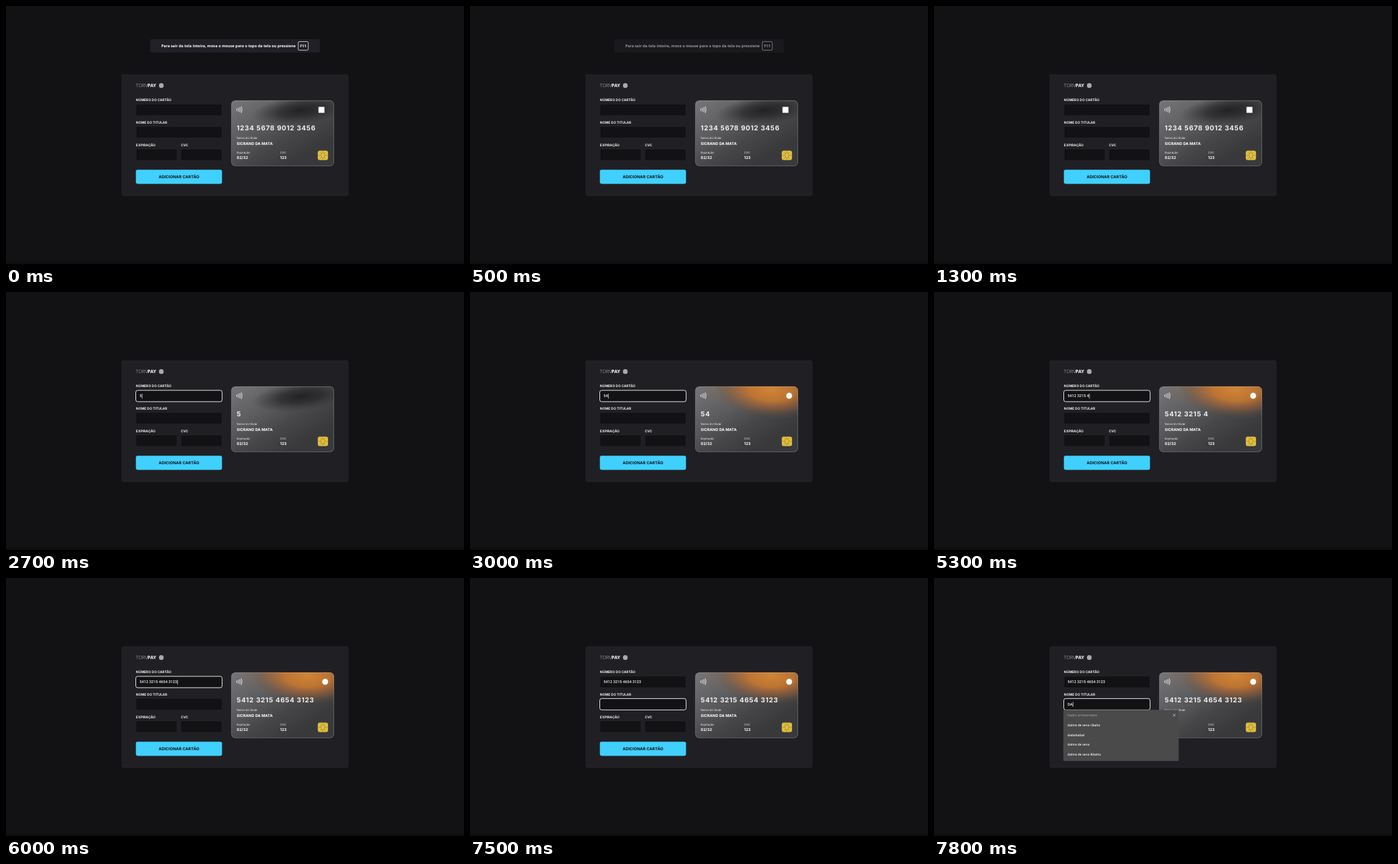
These frames come from a looping animation (690x388 px, 8000 ms). An HTML page with a canvas:

```html
<!DOCTYPE html>
<html lang="pt-BR">
<head>
<meta charset="utf-8">
<title>Cartão</title>
<style>
html, body { margin: 0; width: 100%; height: 100%; overflow: hidden; background: #121214; }
canvas { display: block; width: 690px; height: 388px; }
</style>
</head>
<body>
<canvas id="stage"></canvas>
<script>
const LOOP = 8000, W = 690, H = 388, SCALE = W / 1920;
const canvas = document.getElementById('stage');
const dpr = window.devicePixelRatio || 1;
canvas.width = W * dpr;
canvas.height = H * dpr;
const ctx = canvas.getContext('2d', { alpha: false });

const INTER = 'Inter, sans-serif', ROBOTO = 'Roboto, sans-serif', OPEN = '"Open Sans", sans-serif';
const LIGHT = '#f0f0f3', DARK = '#121214';
const FIELDS = [[545, 411, 360], [545, 504, 360], [545, 598, 172], [733, 598, 172]];
const LABELS = ['NÚMERO DO CARTÃO', 'NOME DO TITULAR', 'EXPIRAÇÃO', 'CVC'];
const NUMBER = '5412 3215 4654 3123';
const SUGGESTIONS = ['dalmo de sena ribalta', 'dadadadad', 'dalmo de sena', 'dalmo de sena Ribalta'];

// [time, characters typed]
const TYPING = [[2700, 1], [2900, 2], [4200, 3], [4600, 4], [4800, 6], [4900, 7], [5000, 8],
  [5200, 9], [5300, 11], [5400, 13], [5500, 14], [5700, 16], [5800, 17], [6000, 19]];
// spans in which the caret is hidden
const CARET_OFF = [[2200, 2700], [3500, 4000], [7500, 7800]];

function text(str, x, y, size, weight, color, family = INTER, align = 'left', spacing = 0) {
  ctx.font = `${weight} ${size}px ${family}`;
  ctx.letterSpacing = spacing + 'px';
  ctx.textAlign = align;
  ctx.fillStyle = color;
  ctx.fillText(str, x, y);
}

function box(x, y, w, h, r, fill, stroke, lineWidth = 1) {
  ctx.beginPath();
  ctx.roundRect(x, y, w, h, r);
  if (fill) { ctx.fillStyle = fill; ctx.fill(); }
  if (stroke) { ctx.strokeStyle = stroke; ctx.lineWidth = lineWidth; ctx.stroke(); }
}

function disc(x, y, r, color) {
  ctx.beginPath();
  ctx.arc(x, y, r, 0, Math.PI * 2);
  ctx.fillStyle = color;
  ctx.fill();
}

function glow(x, y, rx, ry, angle, stops) {
  ctx.save();
  ctx.translate(x, y);
  ctx.rotate(angle);
  ctx.scale(rx, ry);
  const g = ctx.createRadialGradient(0, 0, 0, 0, 0, 1);
  stops.forEach(([at, color]) => g.addColorStop(at, color));
  ctx.fillStyle = g;
  ctx.fillRect(-1, -1, 2, 2);
  ctx.restore();
}

// two-step change starting at a given time
const fade = (t, start) => t < start ? 0 : t < start + 100 ? 0.5 : 1;

function drawNotice(t) {
  const p = Math.max(0, Math.floor(t / 100) - 1) / 9;
  if (p >= 1) return;
  ctx.globalAlpha = 1 - p;
  box(604, 139, 712, 56, 6, '#202026');
  text('Para sair da tela inteira, mova o mouse para o topo da tela ou pressione',
    651, 172.5, 15.75, 700, '#fff', OPEN);
  box(1225, 149, 42, 36, 5, null, '#fff', 2);
  text('F11', 1246, 172.5, 15.75, 700, '#fff', OPEN, 'center');
  ctx.globalAlpha = 1;
}

function drawForm(t, number, name) {
  box(486, 287, 948, 506, 6, '#202024', '#29292e', 2);
  text('TORV', 545, 340, 20, 300, '#d0d0d6', OPEN);
  text('PAY', 593, 340, 20, 700, '#fff', OPEN);
  disc(651, 333, 10, '#a8a8b0');

  const second = fade(t, 7000);
  const focus = [fade(t, 1700) * (1 - second), second, 0, 0];
  FIELDS.forEach(([x, y, w], i) => {
    text(LABELS[i], x, y - 12, 14, 700, LIGHT);
    box(x, y, w, 48, 5, DARK, '#29292e', 1.5);
    if (focus[i]) {
      ctx.globalAlpha = focus[i];
      box(x - 1, y + 0.5, w + 2, 47.5, 8, null, LIGHT, 2.6);
      ctx.globalAlpha = 1;
    }
  });
  text(number, 560, 441, 16, 500, LIGHT, ROBOTO);
  text(name, 560, 534, 16, 500, LIGHT, ROBOTO);

  if (t >= 1700 && !CARET_OFF.some(([a, b]) => t >= a && t < b)) {
    const onName = t >= 7000;
    ctx.font = `500 16px ${ROBOTO}`;
    const x = 560.5 + ctx.measureText(onName ? name : number).width;
    ctx.fillStyle = LIGHT;
    ctx.fillRect(x, onName ? 519 : 426, 2, 20);
  }

  box(544.5, 685, 361, 59, 7, '#40d0ff');
  text('ADICIONAR CARTÃO', 725, 720, 16.8, 700, DARK, INTER, 'center');
}

function drawChip() {
  box(1307, 605, 43, 40, 9, '#e0bf40');
  ctx.strokeStyle = '#94782a';
  ctx.lineWidth = 1.6;
  ctx.beginPath();
  ctx.ellipse(1328.5, 625, 8, 11, 0, 0, Math.PI * 2);
  for (const s of [-1, 1]) {
    ctx.moveTo(1328.5 + s * 8, 625);
    ctx.lineTo(1328.5 + s * 20, 625);
    for (const v of [-1, 1]) {
      ctx.moveTo(1328.5 + s * 6, 625 + v * 8);
      ctx.lineTo(1328.5 + s * 12, 625 + v * 14);
    }
    ctx.moveTo(1328.5, 625 + s * 11);
    ctx.lineTo(1328.5, 625 + s * 18);
  }
  ctx.stroke();
}

function drawCard(t, number, name) {
  const orange = fade(t, 2900);
  ctx.save();
  ctx.beginPath();
  ctx.roundRect(944, 395, 431, 275, 18);
  ctx.clip();
  const base = ctx.createLinearGradient(970, 395, 1150, 690);
  base.addColorStop(0, '#747476');
  base.addColorStop(0.4, '#5c5c5f');
  base.addColorStop(0.7, '#464649');
  base.addColorStop(1, '#39393c');
  ctx.fillStyle = base;
  ctx.fillRect(944, 395, 431, 275);
  ctx.globalAlpha = 1 - orange;
  glow(1235, 436, 205, 62, -0.12, [[0, 'rgba(28,28,31,.9)'], [0.45, 'rgba(32,32,35,.65)'], [1, 'rgba(45,45,48,0)']]);
  ctx.globalAlpha = orange;
  glow(1120, 405, 170, 100, 0.25, [[0, 'rgba(160,112,66,.5)'], [1, 'rgba(130,100,75,0)']]);
  glow(1262, 408, 240, 122, 0.08, [[0, 'rgba(212,134,52,.97)'], [0.4, 'rgba(202,120,46,.88)'],
    [0.7, 'rgba(155,98,56,.5)'], [1, 'rgba(85,72,66,0)']]);
  ctx.restore();

  const edge = ctx.createLinearGradient(944, 395, 1375, 670);
  edge.addColorStop(0, 'rgba(255,255,255,.2)');
  edge.addColorStop(1, 'rgba(255,255,255,.34)');
  box(945, 396, 429, 273, 17, null, edge, 2);

  ctx.strokeStyle = LIGHT;
  ctx.lineWidth = 2.6;
  for (let i = 0; i < 4; i++) {
    ctx.beginPath();
    ctx.arc(956, 434, 12 + 7 * i, -0.42, 0.42);
    ctx.stroke();
  }

  if (t < 2700) box(1310, 422, 25, 25, 0, '#fff');
  else if (t >= 2900) disc(1338, 434, 12.5, '#fff');

  text(number, 967, 521, 28, 700, LIGHT, INTER, 'left', 1.9);
  text('Nome do titular', 967, 556, 12, 400, LIGHT);
  text(name, 967, 580.5, 16, 700, '#fff');
  text('Expiração', 967, 616.5, 12, 400, LIGHT);
  text('02/32', 967, 640.5, 16, 700, '#fff');
  text('CVC', 1149, 616.5, 12, 400, LIGHT);
  text('123', 1149, 640.5, 16, 700, '#fff');
  drawChip();
}

function drawSuggestions() {
  box(543, 552, 482, 213, 2, '#4a4a4b', '#58585a', 1);
  text('Dados armazenados', 560, 579, 13, 400, '#b4b4b6', OPEN);
  ctx.strokeStyle = '#dcdcde';
  ctx.lineWidth = 2;
  ctx.beginPath();
  ctx.moveTo(1002, 569); ctx.lineTo(1012, 579);
  ctx.moveTo(1012, 569); ctx.lineTo(1002, 579);
  ctx.stroke();
  SUGGESTIONS.forEach((s, i) => text(s, 560, 621 + i * 40.7, 13, 600, '#fff', OPEN));
}

function render(t) {
  ctx.setTransform(dpr * SCALE, 0, 0, dpr * SCALE, 0, 0);
  ctx.textRendering = 'geometricPrecision';
  ctx.fillStyle = DARK;
  ctx.fillRect(0, 0, 1920, 1080);
  ctx.fillStyle = '#0e0d0f';
  ctx.fillRect(0, 1070, 1920, 10);

  const typed = TYPING.reduce((n, [at, count]) => t >= at ? count : n, 0);
  const number = NUMBER.slice(0, typed);
  const name = t >= 7800 ? 'DA' : '';
  drawNotice(t);
  drawForm(t, number, name);
  drawCard(t, number || '1234 5678 9012 3456', name || 'SICRANO DA MATA');
  if (name) drawSuggestions();
}

function tick() {
  render(performance.now() % LOOP);
  requestAnimationFrame(tick);
}
tick();
</script>
</body>
</html>
```
